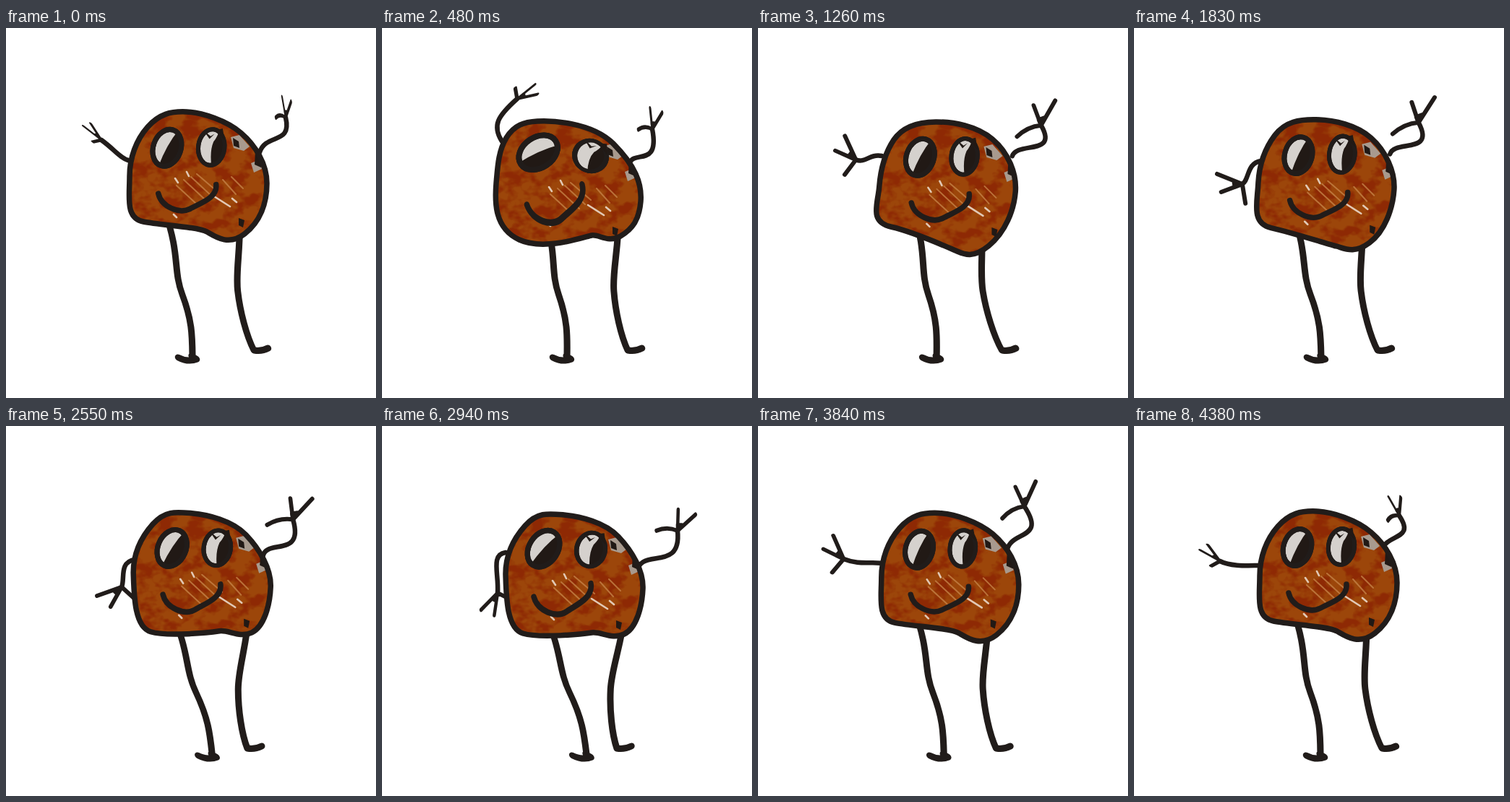
Recreate the animation shown at these times as an HTML page without scripts. Size 512x512 px, loop 4410 ms.

```html
<!DOCTYPE html>
<html lang="en">
<head>
<meta charset="utf-8">
<title>Dancing blob</title>
<style>
/* Pose controls: torso offset, gaze, finger spread, foot positions, leg leans */
@property --x { syntax: "<number>"; inherits: true; initial-value: 0; }
@property --y { syntax: "<number>"; inherits: true; initial-value: 0; }
@property --look { syntax: "<number>"; inherits: true; initial-value: 0; }
@property --spread { syntax: "<number>"; inherits: true; initial-value: 1; }
@property --foot-l { syntax: "<number>"; inherits: true; initial-value: 258; }
@property --foot-r { syntax: "<number>"; inherits: true; initial-value: 343; }
@property --lean-l { syntax: "<number>"; inherits: true; initial-value: 10; }
@property --lean-r { syntax: "<number>"; inherits: true; initial-value: 6; }

html, body { margin: 0; width: 100%; height: 100%; overflow: hidden; background: #fff; }
svg { display: block; width: 100%; height: 100%; }
.ink { fill: none; stroke: #211c1a; stroke-linecap: round; stroke-linejoin: round; }
.dark { fill: #211915; stroke: none; }
svg, .body, .arm-l, .arm-r { animation: dance 4410ms ease-in-out infinite; }
.body { animation-name: body; }
.arm-l { animation-name: arm-l; marker-end: url(#hand-l); }
.arm-r { animation-name: arm-r; marker-end: url(#hand-r); }

.torso { transform: translate(calc(var(--x) * 1px), calc(var(--y) * 1px)); }
.hand { transform: scaleY(var(--spread)); }
.leg-l { transform: translate(calc(var(--foot-l) * 1px), 454px) skewX(calc(var(--lean-l) * 1deg)); }
.leg-r { transform: translate(calc(var(--foot-r) * 1px), 446px) skewX(calc(var(--lean-r) * 1deg)); }
.eye-l {
  transform: translate(calc(223px - var(--look) * .1px), calc(166px - var(--look) * .15px))
    rotate(calc(18deg + var(--look) * 1deg)) scale(calc(1 + var(--look) * .003));
}
.eye-r {
  transform: translate(calc(284px + var(--look) * .2px), 165px)
    rotate(calc(7deg + var(--look) * .4deg))
    scale(calc(1 + var(--look) * .006), calc(1 - var(--look) * .004));
}
.mouth {
  transform: translate(calc(251px - var(--look) * .15px), 240px)
    rotate(calc(var(--look) * -.25deg)) scaleY(calc(1 + var(--look) * .007));
}

@keyframes dance {
  0%, 1.36%, to { --x: 0; --y: 0; --look: 1; --spread: .35; --foot-l: 258; --lean-l: 10; --foot-r: 343; --lean-r: 6.5; }
  10.88% { --x: -3; --y: 12; --look: 38; --spread: .5; --foot-l: 256; --lean-l: 8.4; --foot-r: 340; --lean-r: 4.3; }
  34.01% { --x: 2; --y: 13; --look: -4; --spread: 1; --foot-l: 246; --lean-l: 8.3; --foot-r: 337; --lean-r: 9.8; }
  53.06% { --x: 9; --y: 3; --look: 2; --spread: 1; --foot-l: 286; --lean-l: 15; --foot-r: 337; --lean-r: .7; }
  66.67% { --x: 2; --y: 6; --look: 15; --spread: .75; --foot-l: 283; --lean-l: 16; --foot-r: 325; --lean-r: -3; }
  81.63% { --x: -1; --y: 5; --look: -3; --spread: 1; --foot-l: 257; --lean-l: 11; --foot-r: 326; --lean-r: 2.8; }
  99.3% { --x: 3; --y: 2; --look: 0; --spread: .45; --foot-l: 258; --lean-l: 10; --foot-r: 343; --lean-r: 7; animation-timing-function: step-end; }
}
/* Four silhouettes: neutral, leaning, drooping, flat-bottomed */
@keyframes body {
  0%, 1.36%, 81.63%, 99.3%, to { d: path("M171 205C171 180 180 155 196 137S228 115 250 116S305 128 325 145S361 188 361 215S352 268 330 285S290 289 278 282S215 273 190 268S171 235 171 205Z"); }
  10.88% { d: path("M161 203C163 180 164 158 175 140S200 118 218 117S293 118 323 148S363 203 361 228S350 266 333 276S303 273 293 275S228 297 193 281S159 228 161 203Z"); }
  34.01% { d: path("M167 207C169 182 175 161 188 142S223 117 248 117S302 123 323 140S356 187 354 212S340 270 316 290S280 303 270 298S213 266 182 260S165 232 167 207Z"); }
  53.06%, 66.67% { d: path("M169 199C169 174 179 151 196 132S228 115 250 117S306 127 325 147S360 194 359 219S350 274 333 282S301 278 288 280S216 288 193 281S170 229 169 199Z"); }
}
/* Shoulder to wrist; the hand follows the wrist direction */
@keyframes arm-l {
  0%, 1.36%, to { d: path("M169 183C158 180 150 168 132 155"); }
  5.4% { d: path("M167 172C152 152 145 120 148 94"); }
  10.88% { d: path("M166 157C152 135 160 122 187 98"); }
  22% { d: path("M169 170C152 160 140 155 122 138"); }
  34.01% { d: path("M173 182C155 184 156 210 145 214"); }
  53.06% { d: path("M181 188C158 192 166 214 160 220"); }
  66.67% { d: path("M171 175C150 178 162 205 160 231"); }
  81.63% { d: path("M168 189C146 192 156 214 148 220"); }
  91% { d: path("M171 190C155 186 130 180 102 164"); }
  99.3% { d: path("M174 193C160 193 135 195 119 187"); animation-timing-function: step-end; }
}
@keyframes arm-r {
  0%, 1.36%, to { d: path("M351 172C360 145 396 162 387 124"); }
  5.4% { d: path("M347 178C355 158 408 178 403 130"); }
  10.88% { d: path("M343 186C350 170 384 192 374 140"); }
  34.01% { d: path("M353 176C360 155 420 175 394 134"); }
  53.06% { d: path("M357 171C362 153 412 175 393 124"); }
  66.67% { d: path("M352 205C355 165 415 205 409 145"); }
  81.63% { d: path("M345 172C350 143 402 158 369 108"); }
  99.3% { d: path("M343 172C350 148 390 158 367 124"); animation-timing-function: step-end; }
}
</style>
</head>
<body>
<svg viewBox="0 0 512 512">
  <defs>
    <marker id="hand-l" orient="auto" markerUnits="userSpaceOnUse" overflow="visible">
      <path class="ink hand" stroke-width="6" d="M25 28L0 0L31 3L0 0L8 -26M0 0L9 7L11 1Z"/>
    </marker>
    <marker id="hand-r" orient="auto" markerUnits="userSpaceOnUse" overflow="visible">
      <path class="ink hand" stroke-width="6" d="M20 36L0 0L29 5L0 0Q8 -18 3 -39M0 0L7 9L8 1Z"/>
    </marker>
    <clipPath id="shape"><path class="body"/></clipPath>
    <clipPath id="oval"><ellipse rx="19" ry="26"/></clipPath>
    <filter id="mottle" x="0" y="0" width="1" height="1" color-interpolation-filters="sRGB">
      <feTurbulence type="fractalNoise" baseFrequency=".045 .06" numOctaves="3" seed="7"/>
      <feColorMatrix values="0 0 0 0 .54  0 0 0 0 .13  0 0 0 0 .01  5 0 0 0 -2.2"/>
    </filter>
  </defs>

  <g class="ink" stroke-width="6.5">
    <path class="arm-l"/>
    <path class="arm-r"/>
    <g stroke-width="9">
      <path class="leg-l" d="M-3 -200C8 -140 -6 -120 1 -85S5 -30 0 0m-20 2q12 7 25 2l-6 -4"/>
      <path class="leg-r" d="M2 -190C-2 -140 -13 -110 -13 -82S-8 -20 0 0q10 2 20 -3"/>
    </g>
  </g>

  <g class="torso">
    <g clip-path="url(#shape)">
      <path fill="#9c460a" d="M130 80h260v260h-260z"/>
      <path filter="url(#mottle)" opacity=".75" d="M130 80h260v260h-260z"/>
      <g fill="none" stroke-linecap="round">
        <path stroke="#c58346" stroke-width="2" opacity=".8" d="M246 210l30 28M256 206l28 26M264 202l28 24M236 218l26 24M300 210l18 20M312 206l16 16"/>
        <path stroke="#e2c9b5" stroke-width="2.6" d="M288 233l22 14M234 208l4 6M250 199l3 6M313 236l6 5M232 258l4 4"/>
      </g>
      <path fill="#a89a8e" d="M311 151l12 -3 14 16 -8 6 -14 -4zM339 187l12 -5 3 13 -11 5z"/>
      <path class="dark" d="M314 152l8 5 1 9 -8 -3zM345 170l12 4 -4 19 -9 -4zM322 263l8 3 -2 10 -6 -3z"/>
    </g>
    <g class="ink">
      <path class="body" stroke-width="7.5"/>
      <path class="mouth" stroke-width="7.5" d="M-40 -11C-36 7 -11 18 4 10S42 -5 40 -23"/>
      <g class="eye-l" stroke-width="7">
        <ellipse rx="19" ry="26" fill="#d5d1cd"/>
        <path class="dark" clip-path="url(#oval)" d="M7 -28Q-2 -4 -3 28H24V-28Z"/>
        <ellipse rx="19" ry="26"/>
      </g>
      <g class="eye-r" stroke-width="6">
        <ellipse rx="18" ry="25" fill="#d5d1cd"/>
        <path class="dark" clip-path="url(#oval)" d="M9 -28Q6 -14 2 -8Q-2 6 4 28H24V-28ZM-14 -22L-4 -11L2 -19L-3 -15Z"/>
        <ellipse rx="18" ry="25"/>
        <path class="dark" d="M2 -24L12 -28L17 -12Z"/>
      </g>
    </g>
  </g>
</svg>
</body>
</html>
```
